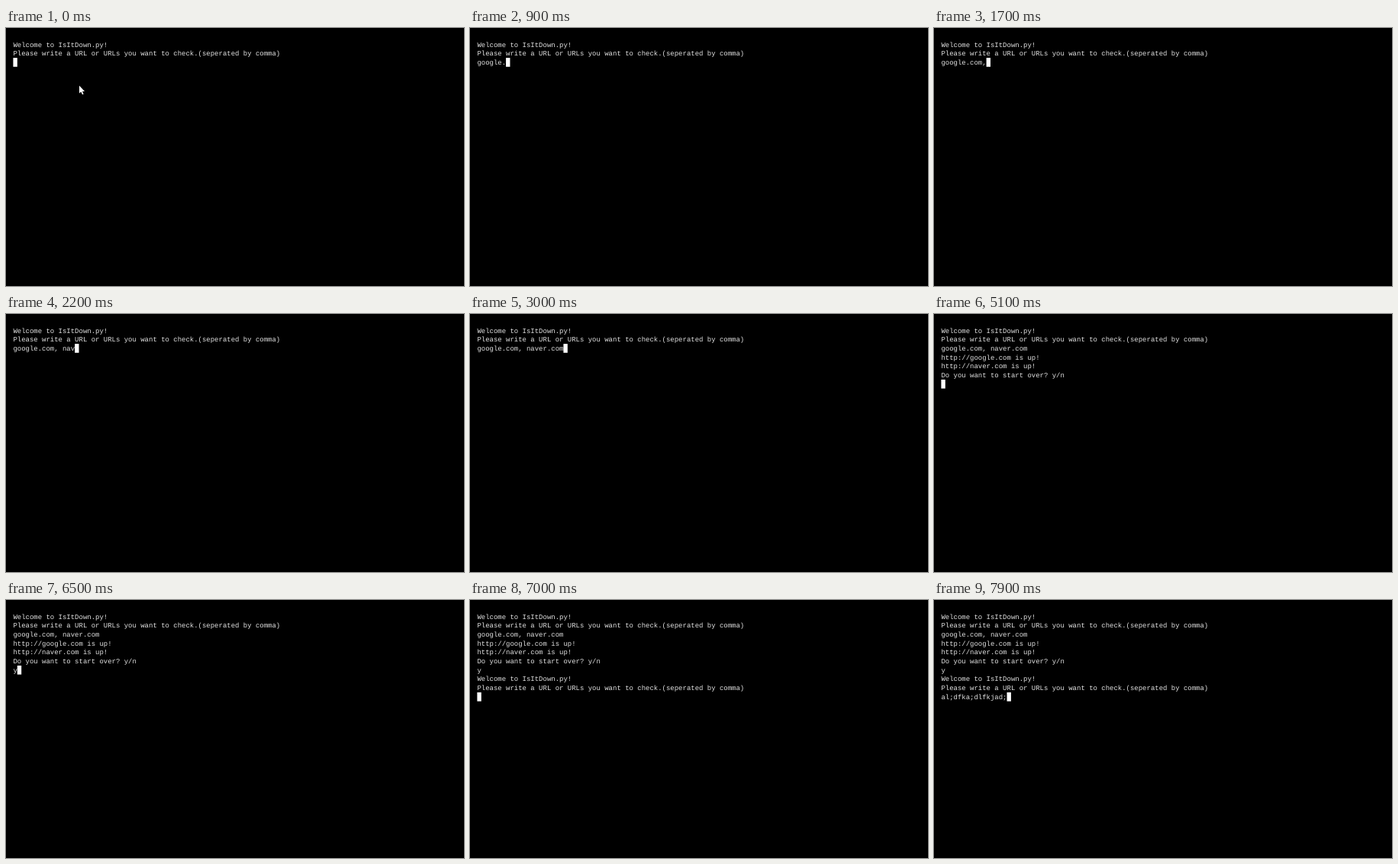
Write an HTML page that moves like this. It is 600 px wide and 338 px high and loops after 8000 ms.

```html
<!DOCTYPE html>
<html lang="en">
<head>
<meta charset="utf-8">
<title>Terminal session</title>
<style>
  html, body { margin: 0; width: 100%; height: 100%; overflow: hidden; background: #000; }
  svg { display: block; width: 600px; height: 338px; background: #000; }
  text {
    font: 8.97px "Liberation Mono", "Courier New", monospace;
    fill: #e2e2e2;
    white-space: pre;
    text-rendering: geometricPrecision;
  }
</style>
</head>
<body>
<svg id="stage" viewBox="0 0 600 338" xmlns="http://www.w3.org/2000/svg">
  <g id="lines"></g>
  <rect id="caret" width="5.4" height="11.7" fill="#fff"/>
  <path id="pointer" d="M96 75.6V85.6L98.3 83.5L100 87.2L101.6 86.5L100 82.9H103Z" fill="#fff"/>
</svg>
<script>
const LOOP = 8000, LEFT = 9.4, CHAR = 5.382, ROW = 11.7, BASELINE = 24.5, CARET_TOP = 15.7;
const POINTER_HIDES = 100;
const PROMPT = "Welcome to IsItDown.py!\n" +
  "Please write a URL or URLs you want to check.(seperated by comma)\n";

// Terminal output as [time in ms, appended text].
const output = [
  [0, PROMPT],
  [200, "g"], [300, "o"], [400, "o"], [500, "g"], [600, "l"], [700, "e"], [900, "."],
  [1000, "co"], [1100, "m"], [1700, ","], [1900, " "],
  [2100, "n"], [2200, "av"], [2300, "e"], [2400, "r"], [2500, "."], [2600, "c"], [2700, "om"],
  [4000, "\n"],
  [4100, "http://google.com is up!\n"],
  [4900, "http://naver.com is up!\n"],
  [5000, "Do you want to start over? y/n\n"],
  [6500, "y"], [6800, "\n"],
  [7000, PROMPT],
  [7400, "al;"], [7500, "df"], [7600, "ka;"], [7700, "dlf"], [7800, "kj"], [7900, "ad;"]
];

const byId = id => document.getElementById(id);
const caret = byId("caret"), pointer = byId("pointer");
const rows = Array.from({ length: 10 }, (_, i) => {
  const row = document.createElementNS("http://www.w3.org/2000/svg", "text");
  row.setAttribute("x", LEFT);
  row.setAttribute("y", BASELINE + i * ROW);
  return byId("lines").appendChild(row);
});

let shown = null;
function render(time) {
  const t = time % LOOP;
  pointer.setAttribute("visibility", t < POINTER_HIDES ? "visible" : "hidden");
  const screen = output.filter(([at]) => at <= t).map(([, text]) => text).join("");
  if (screen === shown) return;
  shown = screen;
  const lines = screen.split("\n");
  rows.forEach((row, i) => { row.textContent = lines[i] || ""; });
  const last = lines.length - 1;
  caret.setAttribute("x", LEFT + lines[last].length * CHAR);
  caret.setAttribute("y", CARET_TOP + last * ROW);
}

const start = performance.now();
function tick() {
  render(performance.now() - start);
  requestAnimationFrame(tick);
}
tick();
</script>
</body>
</html>
```
